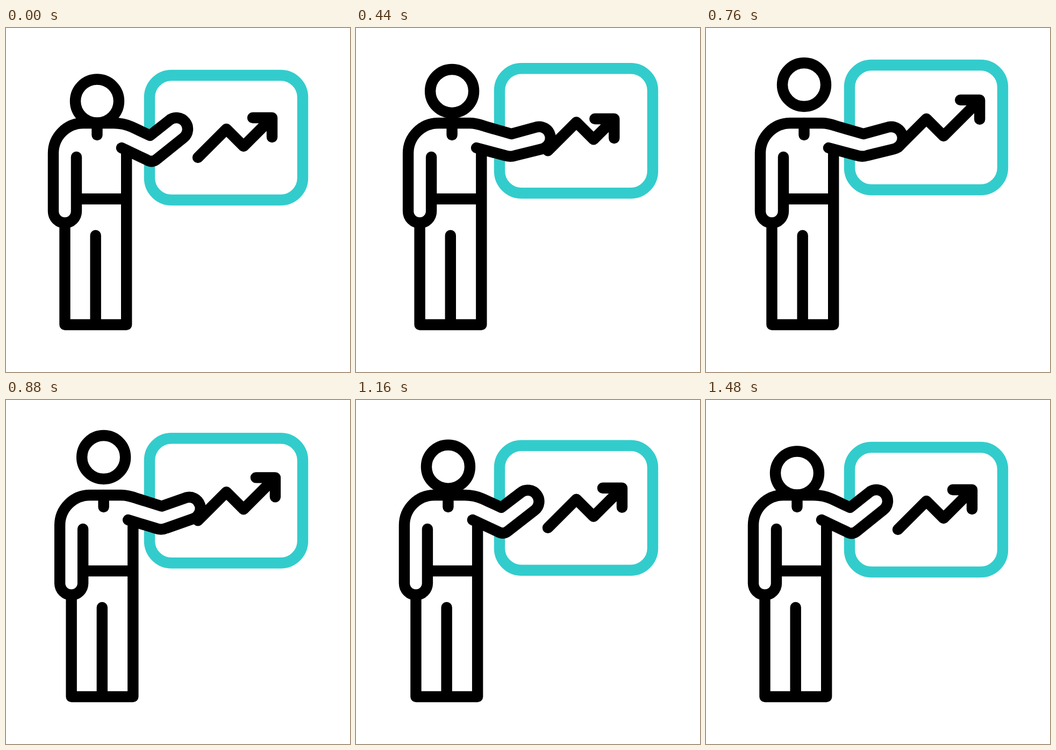
An HTML page for the animation above (1680 ms loop, 640x640 px).

```html
<!DOCTYPE html>
<html lang="en">
<head>
<meta charset="utf-8">
<title>Presenter</title>
<style>
  html, body { margin: 0; width: 100%; height: 100%; overflow: hidden; background: #fff; }
  svg { display: block; width: 100%; height: 100%; }
</style>
</head>
<body>
<svg viewBox="0 0 640 640" fill="none" stroke="#000" stroke-width="20.4" stroke-linecap="round" stroke-linejoin="round">
  <g id="board">
    <rect x="267" y="88" width="285" height="232" rx="41" stroke="#33cccc"/>
    <path id="arrow"/>
  </g>
  <g id="figure">
    <path d="M109.5 365V552H224.2V230M166.7 386V552M131 318H224"/>
    <path id="torso" fill="#fff"/>
    <path d="M169.5 177V199"/>
    <circle id="head" cx="169.5" cy="136" r="40.5"/>
  </g>
</svg>
<script>
const LOOP = 1680, STEP = 40;
const el = id => document.getElementById(id);
const [board, arrow, figure, torso, head] = ['board', 'arrow', 'figure', 'torso', 'head'].map(el);

const clamp = u => Math.min(1, Math.max(0, u));
const quad = u => u < .5 ? 2 * u * u : 1 - 2 * (1 - u) ** 2;
const smooth = u => u * u * (3 - 2 * u);
const ramp = (t, from, to, ease = quad) => ease(clamp((t - from) / (to - from)));
// Rises over a..b, holds, falls over c..d
const swing = (t, a, b, c, d) => ramp(t, a, b) - ramp(t, c, d);

function torsoPath(k) {
  const p = (x0, y0, x1, y1) => `${x0 + (x1 - x0) * k} ${y0 + (y1 - y0) * k} `;
  return 'M215 223L' + p(262, 245.3, 267, 236.8) +
    'Q' + p(272, 251.5, 277.8, 240.5) + p(281, 243.7, 288, 236.9) +
    'L' + p(330.1, 204.4, 336.7, 225.5) +
    'A1 1 0 0 0 ' + p(303.9, 171.6, 327.3, 184.5) +
    'L' + p(268, 200, 280, 197) + p(234, 184, 231, 183) +
    'C' + p(222, 178.5, 222, 180) + p(212, 177, 214, 177) + p(200, 177, 203, 177) +
    'H144A56 56 0 0 0 88 233V341A21.5 21.5 0 0 0 131 341V240';
}

function arrowPath(s) {
  const x = 495 + s, y = 167 - s;
  return `M357 241L410 188L442 220L${x} ${y}M${x - 36} ${y}H${x}V${y + 36}`;
}

function draw(t) {
  const stretch = -16 * ramp(t, 80, 400, smooth) + 31 * ramp(t, 400, 720, smooth)
    - 15 * ramp(t, 720, 1000, smooth);
  arrow.setAttribute('d', arrowPath(stretch));
  torso.setAttribute('d', torsoPath(swing(t, 62, 482, 711, 1234)));
  board.setAttribute('transform', `translate(0 ${-19 * swing(t, 64, 697, 734, 1335)})`);
  figure.setAttribute('transform', `translate(${13 * swing(t, 86, 663, 787, 1300)} 0)`);
  head.setAttribute('cy', 136 - 30.5 * swing(t, 72, 732, 798, 1445));
}

const start = performance.now();
function tick() {
  const t = (performance.now() - start) % LOOP;
  draw(Math.floor(t / STEP) * STEP);
  requestAnimationFrame(tick);
}
tick();
</script>
</body>
</html>
```
